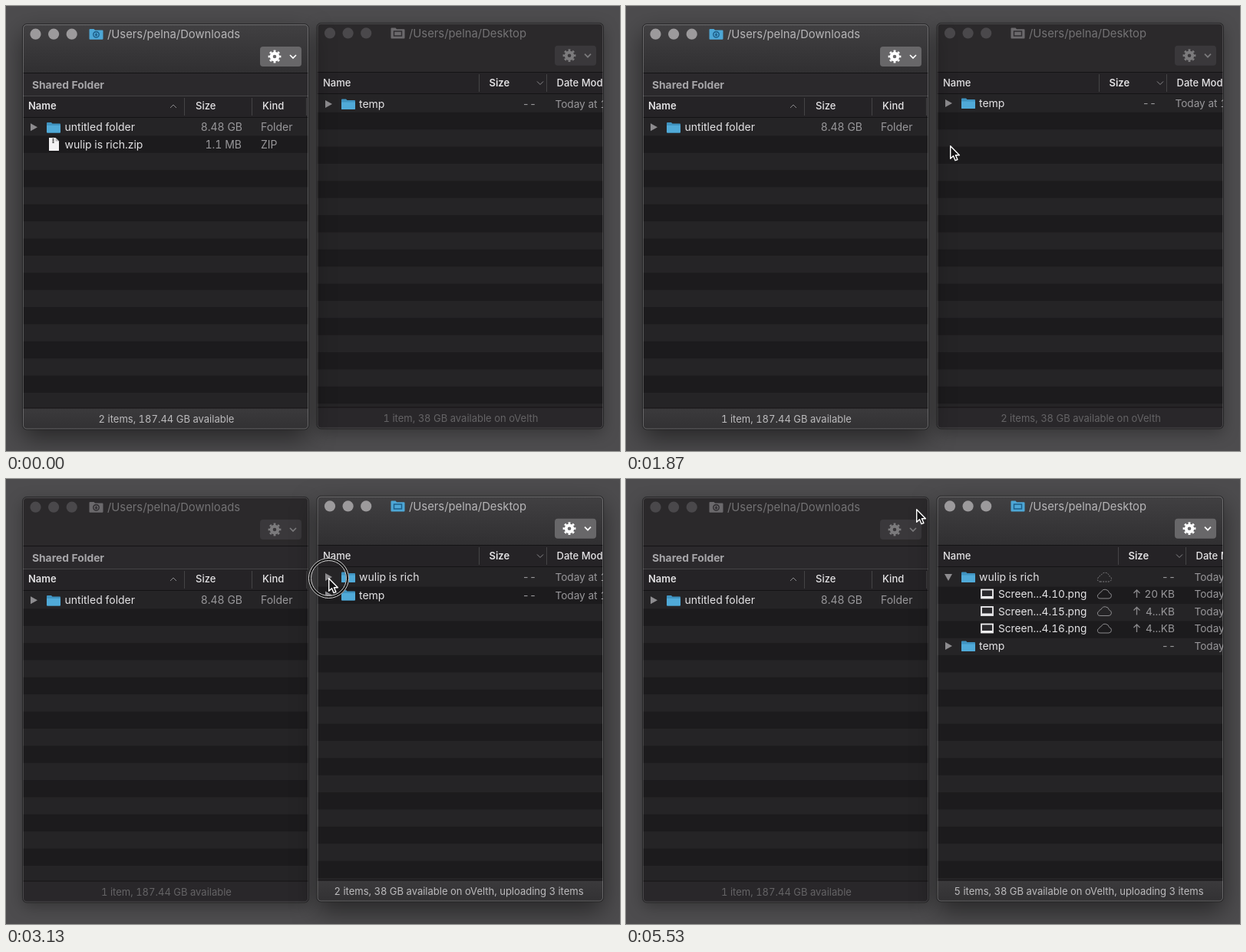
Write an HTML page that moves like this. It is 800 px wide and 581 px high and loops after 5590 ms.

```html
<!DOCTYPE html>
<html lang="en">
<head>
<meta charset="utf-8">
<title>Moving an archive between folders</title>
<style>
  html, body { margin: 0; width: 100%; height: 100%; overflow: hidden; background: #4d4c4e; }
  svg { display: block; font: 14px Inter, "Liberation Sans", sans-serif; font-variant-numeric: tabular-nums; fill: #e4e3e5; }
  .win {
    --bar: url(#bar); --foot: url(#foot); --light: #9c9a9c; --title: #b6b5b7;
    --icon: #4da7d6; --mark: #1d5f8a; --btn: #686769; --gear: #fff; --status: #bcbbbd;
    --edge: rgba(255,255,255,.25);
  }
  .win.off {
    --bar: #2b292b; --foot: #29272a; --light: #4a484b; --title: #737274;
    --icon: #6b696c; --mark: #302e31; --btn: #3a383b; --gear: #7b7a7c; --status: #646365;
    --edge: rgba(255,255,255,.16);
  }
  .base { fill: #252426; filter: drop-shadow(0 12px 16px rgba(0,0,0,.5)); }
  .off .base { filter: drop-shadow(0 6px 10px rgba(0,0,0,.3)); }
  .bar { fill: var(--bar); }
  .foot { fill: var(--foot); }
  .edge { fill: none; stroke: var(--edge); }
  .rim { fill: none; stroke: #1b1a1c; stroke-opacity: .7; }
  .lights { fill: var(--light); }
  .title { fill: var(--title); font-size: 14.8px; }
  .icon { fill: var(--icon); }
  .mark { fill: none; stroke: var(--mark); stroke-width: 1.5; }
  .btn { fill: var(--btn); }
  .gear { fill: none; stroke: var(--gear); }
  .status { fill: var(--status); font-size: 13px; text-anchor: middle; }
  .head { font-size: 13px; font-weight: 500; }
  .key { font-weight: 600; }
  .group { font-size: 13.8px; font-weight: 700; fill: #a6a5a8; }
  .dim { fill: #98979a; }
  .end { text-anchor: end; }
  .day { font-size: 13.6px; }
  .file { font-size: 13.7px; }
  .line { fill: none; stroke: #8a898c; }
  .rule { stroke: #454446; }
  .seam { stroke: #141315; }
  .tri { fill: #8d8c8f; }
  .dark { fill: #1c1b1d; }
  .wide .col { transform: translateX(25px); }
  .late { display: none; }
  .wide .late { display: inline; }
</style>
</head>
<body>
<svg id="stage" width="800" height="581" viewBox="0 0 800 581"></svg>
<script>
const LOOP = 5590;
const stage = document.getElementById('stage');

const text = (x, y, s, cls = '', id = '') =>
  `<text x="${x}" y="${y}" class="${cls}"${id && ` id="${id}"`}>${s}</text>`;
const rect = (x, y, w, h, cls, r = 0) =>
  `<rect x="${x}" y="${y}" width="${w}" height="${h}" rx="${r}" class="${cls}"/>`;
const path = (d, cls, extra = '') => `<path d="${d}" class="${cls}" ${extra}/>`;
const range = (n, fn) => Array.from({ length: n }, (_, i) => fn(i)).join('');

const folder = (x, y) => `<g transform="translate(${x} ${y})">
  <path d="M0-5.5q0-1 1-1h5l1.5 1.6h9.5q1 0 1 1V6q0 1-1 1H1q-1 0-1-1z" fill="#3f93c0"/>
  <path d="M0-2.6h18V6q0 1-1 1H1q-1 0-1-1z" fill="#50aad8"/></g>`;
const triangle = (x, y, id = '') =>
  `<g transform="translate(${x} ${y})"><path ${id && `id="${id}"`} class="tri" d="M-4-5L5 0L-4 5z"/></g>`;
const cloud = (y, cls, dash = '') =>
  path(`M618 ${y + 6}h11a3.7 3.7 0 0 0 .6-7.3a5.5 5.5 0 0 0-10.4-1.2a3.3 3.3 0 0 0-2.7 2.5a3.1 3.1 0 0 0 1.5 6z`,
    'line ' + cls, dash && `stroke-dasharray="${dash}"`);

function frame({ x, y, w, h, id, title, mark, list, body, status }) {
  const bx = x + w - 63, by = y + 29, gx = bx + 19, gy = by + 13;
  return `<g id="${id}" class="win">
    ${rect(x, y, w, h, 'base', 5)}
    <clipPath id="${id}Clip">${rect(x, y, w, h, '', 5)}</clipPath>
    <g clip-path="url(#${id}Clip)">
      ${rect(x, y, w, 64, 'bar')}
      <g class="lights">${range(3, i => `<circle cx="${x + 16.5 + i * 23.6}" cy="${y + 12.7}" r="7.1"/>`)}</g>
      <g transform="translate(${title.x - 23.5} ${y + 12.7})">
        ${path('M0-5.8q0-1 1-1h5l1.5 1.7h9.5q1 0 1 1V6q0 1-1 1H1q-1 0-1-1z', 'icon')}${path(mark, 'mark')}
      </g>
      ${text(title.x, y + 18.3, title.s, 'title')}
      ${rect(bx, by, 54, 26, 'btn', 4)}
      <g class="gear">
        <circle cx="${gx}" cy="${gy}" r="4.3" stroke-width="4"/>
        <circle cx="${gx}" cy="${gy}" r="7" stroke-width="2.8" pathLength="16" stroke-dasharray="1 1" stroke-dashoffset=".5"/>
        ${path(`M${gx + 20} ${gy - 2}l4 4l4-4`, '', 'stroke-width="1.7"')}
      </g>
      <g id="${id}Rows">${range(10, i => rect(x, list + 22.37 * (2 * i + 1), w, 22.37, 'dark'))}</g>
      ${body}
      ${rect(x, y + h - 27.5, w, 28, 'foot')}
      ${path(`M${x} ${y + h - 27.5}h${w}`, 'seam')}
      ${text(status, y + h - 8.8, '', 'status', id + 'Status')}
    </g>
    ${rect(x - .5, y - .5, w + 1, h + 1, 'rim', 5.5)}
    ${rect(x + .5, y + .5, w - 1, h - 1, 'edge', 4.5)}
  </g>`;
}

const leftBody = `
  <path d="M22 88h372v30H22z" fill="#2b292c"/>
  <path d="M22 118h372v27H22z" fill="#252326"/>
  ${path('M22 87.5h372M22 145.5h372', 'seam')}
  ${path('M22 117.5h372M232.5 120v23M320.5 120v23M391.5 120v23', 'rule')}
  ${text(34, 108, 'Shared Folder', 'group')}
  ${text(29, 135.3, 'Name', 'head key')}${text(247, 135.3, 'Size', 'head')}${text(334, 135.3, 'Kind', 'head')}
  ${path('M214 133l4-4l4 4', 'line')}
  ${triangle(36, 158.3)}${folder(53, 158.5)}
  ${text(76.5, 163.3, 'untitled folder')}${text(308, 163.3, '8.48 GB', 'dim end')}${text(332, 163.3, 'Folder', 'dim')}
  <g id="zip">
    <path d="M56 172h8.5l4.5 4.5V189H56z" fill="#f3f2f4"/>
    <path d="M64.5 172v4.5H69z" fill="#b9b8bb"/>
    <path d="M61.5 173v6" stroke="#333" stroke-width="2" stroke-dasharray="1.5 .7"/>
    ${text(76.5, 186, 'wulip is rich.zip')}${text(307, 186, '1.1 MB', 'dim end')}${text(332, 186, 'ZIP', 'dim')}
  </g>`;

const folderRow = (id, name, tri = '') => `<g id="${id}">
  ${triangle(420, 0, tri)}${folder(437, 0)}${text(460, 5, name)}
  <g class="col">${text(691, 5, '--', 'dim end')}${text(715.5, 5, 'Today at 1:14 PM', 'dim day')}</g></g>`;

const fileRow = (num, y, id) => `
  <rect x="463" y="${y - 5.5}" width="15" height="11" fill="#2c2b2e" stroke="#f0eff1" stroke-width="1.8"/>
  <path d="M464 ${y + 4}h13" stroke="#f0eff1" stroke-width="2"/>
  ${text(485, y + 5, `Screen...4.${num}.png`, 'file')}${cloud(y, '')}
  ${path(`M665.5 ${y + 5}v-10m-4 4l4-4l4 4`, 'line', 'stroke-width="1.3"')}
  ${text(715, y + 5, '4...KB', 'dim end file', id)}
  ${text(740.5, y + 5, 'Today at 1:14 PM', 'dim day')}`;

const rightBody = `
  <path d="M405 87h373v27H405z" fill="#252326"/>
  ${path('M405 86.5h373M405 114.5h373', 'seam')}
  ${text(413, 104.8, 'Name', 'head')}
  <g class="col">
    ${path('M616.5 89v23M704.5 89v23', 'rule')}
    ${text(629.5, 104.8, 'Size', 'head key')}${path('M692 98.5l4 4l4-4', 'line')}
    ${text(717.5, 104.8, 'Date Modified', 'head')}
  </g>
  <clipPath id="under">${rect(405, 139.5, 373, 400, '')}</clipPath>
  <g clip-path="url(#under)"><g id="files">
    ${fileRow(10, 150, 'firstSize')}${fileRow(15, 172.5)}${fileRow(16, 195)}
  </g></g>
  ${folderRow('fresh', 'wulip is rich', 'twist')}
  ${cloud(128, 'late', '1.8 1.5')}
  ${folderRow('temp', 'temp')}`;

stage.innerHTML = `
  <defs>
    <linearGradient id="bar" x2="0" y2="1"><stop stop-color="#414042"/><stop offset="1" stop-color="#302f31"/></linearGradient>
    <linearGradient id="foot" x2="0" y2="1"><stop stop-color="#3b3a3c"/><stop offset="1" stop-color="#323133"/></linearGradient>
  </defs>
  <rect width="800" height="581" fill="#4d4c4e"/>
  ${frame({ x: 22, y: 24, w: 372, h: 528.5, id: 'left', list: 147, body: leftBody, status: 209,
    title: { x: 132, s: '/Users/pelna/Downloads' },
    mark: 'M9-3.3a3.8 3.8 0 1 0 .01 0zM9-1.5v3.5m-1.5-1.5l1.5 1.5l1.5-1.5' })}
  ${frame({ x: 405.5, y: 22.7, w: 372.5, h: 528.8, id: 'right', list: 116.5, body: rightBody, status: 592.5,
    title: { x: 525, s: '/Users/pelna/Desktop' },
    mark: 'M4-2.5h10v6h-10z' })}
  <g id="pointer">
    <g id="ring" fill="none" transform="translate(.5 .5)">
      <circle r="24.5" stroke="#111" stroke-width="4"/>
      <circle r="26" stroke="#d8d7d9"/><circle r="23" stroke="#d8d7d9"/>
    </g>
    <path d="M.7.8V17.3L4.5 13.8L7 19.7L9.9 18.5L7.4 12.7H12.4Z" fill="#141315" stroke="#fff" stroke-width="1.4" stroke-linejoin="round"/>
  </g>`;

const $ = id => document.getElementById(id);
const show = (id, on) => { $(id).style.display = on ? 'inline' : 'none'; };
const shift = (id, x, y) => $(id).setAttribute('transform', `translate(${x} ${y})`);
const put = (id, s) => { if ($(id).textContent !== s) $(id).textContent = s; };
const within = (t, a, b) => t >= a && t < b;
const clamp = v => Math.max(0, Math.min(1, v));

// time, x, y of the pointer tip
const route = [
  [70, 2, 196], [200, 62, 184], [530, 429, 207], [600, 428, 205], [790, 417, 189],
  [1670, 417, 189], [1860, 422, 182], [2230, 422, 182], [2720, 422, 138],
  [2870, 422, 138], [3060, 420, 129], [5410, 420, 129], [5470, 413, 114], [5530, 378, 39]
];

function pointerAt(t) {
  const i = route.findIndex(k => k[0] > t);
  if (i < 0) return route.at(-1).slice(1);
  if (i === 0) return route[0].slice(1);
  const [a, b] = [route[i - 1], route[i]];
  const u = (t - a[0]) / (b[0] - a[0]), e = u * u * (3 - 2 * u);
  return [a[1] + (b[1] - a[1]) * e, a[2] + (b[2] - a[2]) * e];
}

// The active window lies on top, so its shadow falls on the other one.
function focus(front, back) {
  $(front).classList.remove('off');
  $(back).classList.add('off');
  if ($('pointer').previousElementSibling !== $(front)) $('pointer').before($(front));
}

const DROP = 1270, COUNT = 1730, ARRIVE = 2000, UPLOAD = 2470, FOCUS = 3070, OPEN = 3270;

function draw(t) {
  const open = t >= OPEN, arrived = t >= ARRIVE;
  const grow = 1 - (1 - clamp((t - OPEN) / 390)) ** 3;

  if (t < FOCUS) focus('left', 'right');
  else focus('right', 'left');
  $('right').classList.toggle('wide', open);

  show('zip', t < DROP);
  put('leftStatus', `${t < DROP ? '2 items' : '1 item'}, 187.44 GB available`);

  const count = open ? '5 items' : t >= COUNT ? '2 items' : '1 item';
  put('rightStatus', `${count}, 38 GB available on oVelth${t >= UPLOAD ? ', uploading 3 items' : ''}`);
  $('rightStatus').setAttribute('x', t >= UPLOAD ? 590 : 592.5);

  show('fresh', arrived);
  shift('fresh', 0, 128);
  shift('temp', 0, arrived ? 151.5 + 66.5 * grow : t >= COUNT ? 127 : 128);
  shift('rightRows', 0, arrived ? 1.8 : 0);
  $('twist').setAttribute('transform', `rotate(${90 * clamp((t - OPEN + 70) / 100)})`);

  show('files', open);
  shift('files', 0, 67 * (grow - 1));
  put('firstSize', t >= 4600 ? '20 KB' : '4...KB');

  show('pointer', t >= 70);
  shift('pointer', ...pointerAt(t));
  show('ring', within(t, 200, 560) || within(t, 3040, 3230));
}

const start = performance.now();
function tick() {
  draw((performance.now() - start) % LOOP);
  requestAnimationFrame(tick);
}
draw(0);
requestAnimationFrame(tick);
</script>
</body>
</html>
```
